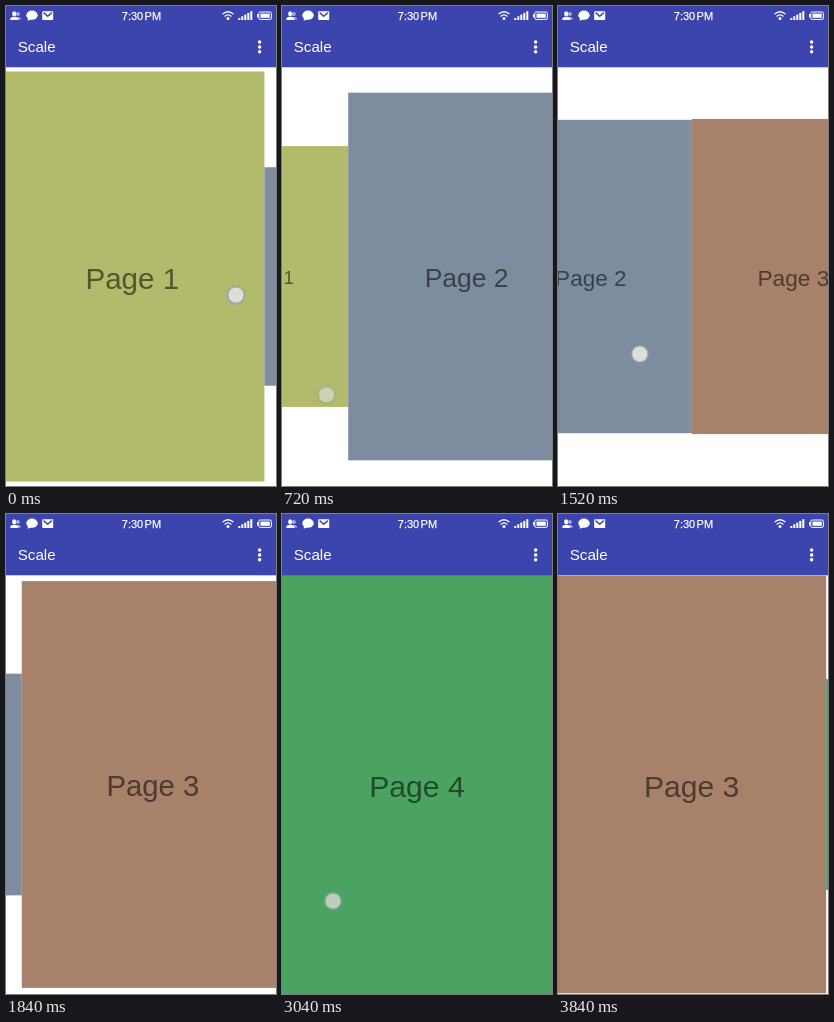
These frames come from a looping animation (270x480 px, 3.92 s). An HTML page:

```html
<!DOCTYPE html>
<html lang="en">
<head>
<meta charset="utf-8">
<title>Scale</title>
<style>
  html, body { margin: 0; width: 100%; height: 100%; overflow: hidden; background: #fff; }
  svg { display: block; width: 100vw; height: 100vh; }
  text { font-family: "Liberation Sans", Arial, sans-serif; }
</style>
</head>
<body>
<svg viewBox="0 0 270 480">
  <rect width="270" height="480" fill="#fff"/>
  <g id="pages"></g>
  <g id="touch">
    <circle r="9.3" fill="none" stroke="#8f96b4" stroke-opacity=".4" stroke-width="1.4"/>
    <circle r="8" fill="#dfddd7" stroke="#a3a7b2" stroke-width="1"/>
  </g>
  <rect width="270" height="61.3" fill="#3b45ad"/>
  <g fill="#fff">
    <text x="11.7" y="46.3" font-size="15.2">Scale</text>
    <text x="115.8" y="13.6" font-size="11" stroke="#fff" stroke-width=".25">7:30<tspan dx="1.4">PM</tspan></text>
    <g id="dots"></g>
    <!-- contacts -->
    <g opacity=".55"><circle cx="11.9" cy="8" r="1.9"/><path d="M10 13.6v-1.5q2-2.4 5 .3v1.2z"/></g>
    <ellipse cx="8.2" cy="7.8" rx="2.1" ry="2.5"/>
    <path d="M4.3 14v-1.4q1-1.5 3-1.8h2q2 .3 3 1.8V14z"/>
    <!-- message -->
    <ellipse cx="26" cy="9.2" rx="5.7" ry="4.6"/>
    <path d="M22 11.5l-.4 3.3 4-1.6z"/>
    <!-- mail -->
    <rect x="36.2" y="5.2" width="11" height="8.8" rx=".8"/>
    <path d="M37.6 6.6l4.1 3.6 4.1-3.6" fill="none" stroke="#3b45ad" stroke-width="1.5"/>
    <!-- wifi -->
    <g fill="none" stroke="#fff" stroke-width="1.3">
      <path d="M216.6 8.1q5.4-4.8 10.8 0"/>
      <path d="M218.6 10.4q3.4-3 6.8 0"/>
    </g>
    <circle cx="222" cy="12.6" r="1.5"/>
    <g id="bars"></g>
    <!-- battery -->
    <rect x="252.8" y="6" width="12.6" height="7.4" rx="1.4" fill="none" stroke="#fff"/>
    <rect x="254.5" y="7.6" width="9.3" height="4.2"/>
    <rect x="251" y="8" width="1.4" height="3.4"/>
  </g>
</svg>
<script>
const W = 270, TOP = 61, H = 419, MID = TOP + H / 2, LOOP = 3920;
const $ = id => document.getElementById(id);

function add(parent, tag, attrs) {
  const el = document.createElementNS("http://www.w3.org/2000/svg", tag);
  for (const k in attrs) el.setAttribute(k, attrs[k]);
  return parent.appendChild(el);
}

const pages = ["#b1bb6b", "#7d8d9f", "#a78169", "#4aa361"].map((fill, i) => {
  const g = add($("pages"), "g", {});
  add(g, "rect", { width: W, height: H, y: -H / 2, fill });
  add(g, "text", { x: W / 2, y: 12.3, "font-size": 30.2, "text-anchor": "middle", fill: "#000", "fill-opacity": .54 })
    .textContent = "Page " + (i + 1);
  return g;
});
for (let i = 0; i < 3; i++) add($("dots"), "circle", { cx: 253.6, cy: 36 + i * 4.9, r: 1.75 });
for (let i = 0; i < 5; i++) {
  const h = 2 + i * 1.7;
  add($("bars"), "rect", { x: 232.3 + i * 3, y: 14 - h, width: 2, height: h });
}

// from: page index; drag: signed distance in pages before the finger lifts
const swipes = [
  { press: -300, start: -130, lift: 710, settle: 575, from: 0, dir: 1, drag: .73, x: 241.6, y: 289 },
  { press: 1100, start: 1200, lift: 1668, settle: 575, from: 1, dir: 1, drag: .65, x: 218, y: 283.5 },
  { press: 2070, start: 2170, lift: 2540, settle: 500, from: 2, dir: 1, drag: .555, x: 199, y: 285 },
  { press: 2950, start: 3060, lift: 3520, settle: 576, from: 3, dir: -1, drag: .6, x: 51, y: 294 }
];

const clamp = v => Math.min(1, Math.max(0, v));
const sine = u => (1 - Math.cos(Math.PI * u)) / 2;
const quintOut = u => 1 - (1 - u) ** 5;

function draw(t) {
  const s = swipes.filter(w => t >= w.press).pop();
  const dragged = s.drag * sine(clamp((t - s.start) / (s.lift - s.start)));
  const flung = (1 - s.drag) * quintOut(clamp((t - s.lift) / s.settle));
  const pos = s.from + s.dir * (dragged + flung);

  pages.forEach((g, i) => {
    const d = i - pos, k = 1 - Math.abs(d) / 2;
    const shown = Math.abs(d) < 1;
    g.style.display = shown ? "" : "none";
    // left neighbour pivots on its right edge, right neighbour on its left
    const x = d > 0 ? W * d : W * (1 + d - k);
    if (shown) g.setAttribute("transform", `translate(${x} ${MID}) scale(${k})`);
  });

  const x = s.x - s.dir * W * dragged;
  const y = s.y + .00275 * (235 - x) ** 2;
  const alpha = clamp((t - s.press) / 120) * clamp((s.lift + 100 - t) / 140);
  $("touch").setAttribute("transform", `translate(${x} ${y})`);
  $("touch").setAttribute("opacity", alpha);
}

const t0 = performance.now();
function tick(now) {
  draw(Math.max(0, now - t0) % LOOP);
  requestAnimationFrame(tick);
}
draw(0);
requestAnimationFrame(tick);
</script>
</body>
</html>
```
